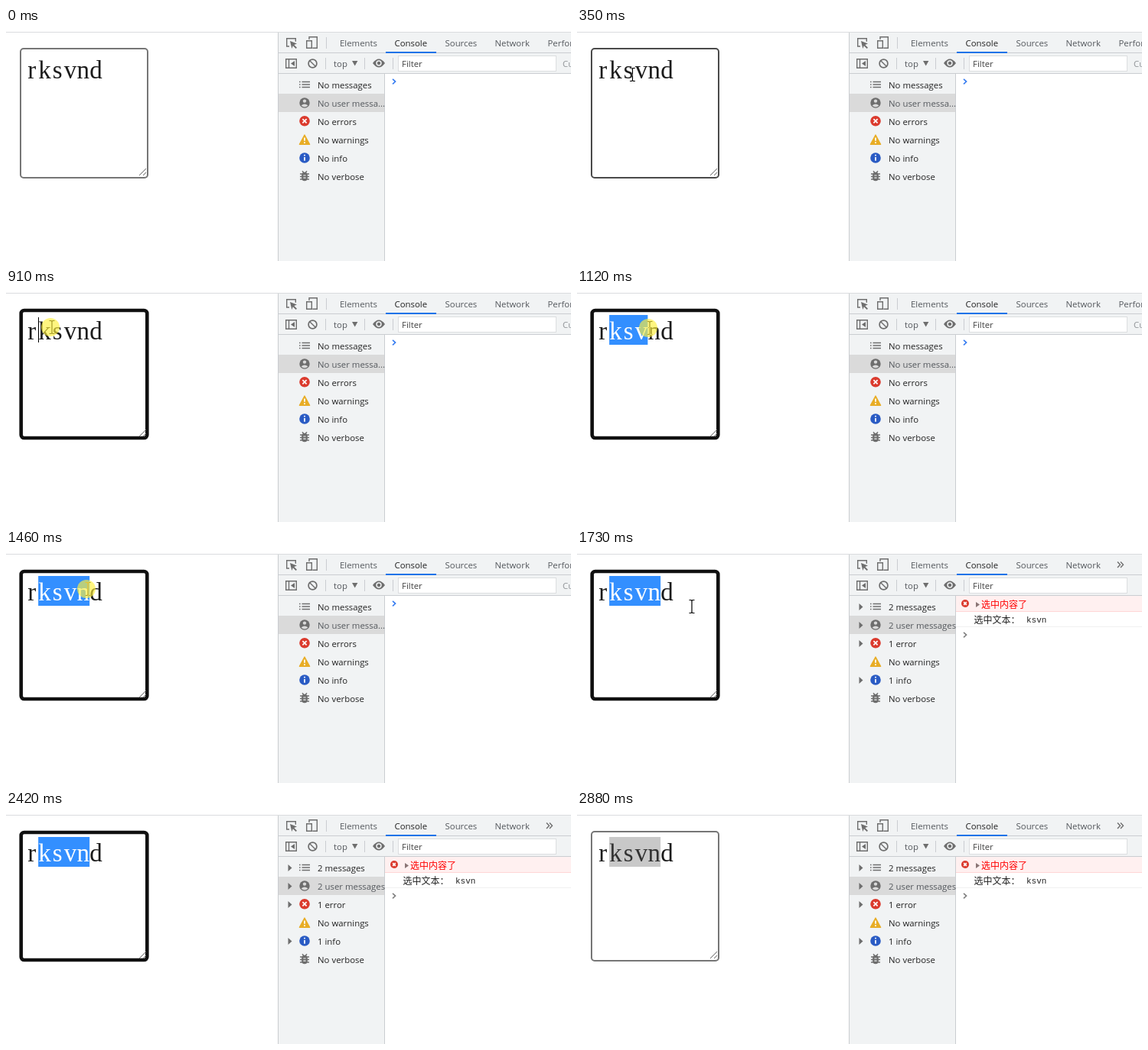
An HTML page that plays this animation: 738x305 px, repeating every 3010 ms.

```html
<!DOCTYPE html>
<html lang="en">
<head>
<meta charset="utf-8">
<title>Text selection with console output</title>
<style>
  html, body { margin: 0; width: 100%; height: 100%; overflow: hidden; background: #fff; }
  svg { display: block; }
  text { font: 11.4px "Open Sans", sans-serif; fill: #222; white-space: pre; }
  .muted { fill: #54585d; }
  .field { font: 33px "Liberation Serif", serif; text-anchor: middle; }
  .cjk { font: 12px "Noto Sans CJK SC", "Noto Sans CJK", sans-serif; }
  .mono { font: 11px "Liberation Mono", monospace; }
  .line { fill: none; stroke: #6e6e6e; stroke-width: 1.4; }
  .rule { fill: none; stroke: #cacdd1; }
  .gray { fill: #6e6e6e; }
  .white { fill: none; stroke: #fff; stroke-width: 1.7; }
</style>
</head>
<body>
<svg width="738" height="305" viewBox="0 0 738 305">
  <rect width="738" height="305" fill="#fff"/>

  <!-- text area -->
  <rect id="frame" fill="#fff"/>
  <path d="M174 193l9-9M179 193l4-4" stroke="#666" stroke-width="1"/>
  <rect id="selection" y="34" height="39"/>
  <g id="letters"></g>
  <path id="caret" d="M42.5 37v33" stroke="#000"/>

  <!-- developer tools -->
  <rect x="355" y="6" width="383" height="299" fill="#f1f3f4"/>
  <rect x="495" y="60" width="243" height="245" fill="#fff"/>
  <rect x="356" y="86" width="138" height="24" fill="#dadada"/>
  <path class="rule" d="M0 5.5H738" stroke-opacity=".7"/>
  <path class="rule" d="M355.5 6V305M356 32.5H738M356 59.5H738M494.5 60V305M418.5 12V27M417.5 39V54M468.5 39V54M505.5 39V54"/>
  <rect x="496" y="31" width="66" height="2" fill="#1a73e8"/>

  <!-- tab bar -->
  <path class="line" d="M370 24h-3.3v-10.3h11.6v4"/>
  <path class="gray" d="M371 17l9 3.4-3.7 1.5 3.7 3.8-1.4 1.4-3.8-3.8-1.5 3.7z"/>
  <path class="line" d="M396 15v-3.3h10.3v14.6h-6M392.7 16.7h6.6v9.6h-6.6z"/>
  <text class="muted" x="436" y="24">Elements</text>
  <text x="507.5" y="24">Console</text>
  <text class="muted" x="573.5" y="24">Sources</text>
  <text class="muted" x="638.5" y="24">Network</text>

  <!-- console toolbar -->
  <path class="line" d="M365.7 40.7h13.6v11.6h-13.6zM369.5 41v11"/>
  <path class="gray" d="M377 43v7l-5-3.5z"/>
  <circle class="line" cx="400.5" cy="46.5" r="5.4" style="stroke-width:1.7"/>
  <path class="line" d="M396.7 42.7l7.6 7.6"/>
  <text class="muted" x="428" y="51">top</text>
  <path class="gray" d="M452 43h7.4l-3.7 6.6z"/>
  <path class="gray" d="M479 46q8-11 16 0q-8 11-16 0z"/>
  <circle cx="487" cy="46" r="3.7" fill="#f1f3f4"/>
  <circle class="gray" cx="487" cy="46" r="2.2"/>
  <rect x="512.5" y="36.5" width="206" height="20" fill="#fff" stroke="#dcdee0"/>
  <text x="517" y="51" fill-opacity=".85">Filter</text>

  <!-- sidebar icons -->
  <path class="line" d="M386.5 70.5h10.5M386.5 74h10.5M386.5 77.5h10.5M383 70.5h1.6M383 74h1.6M383 77.5h1.6"/>
  <circle class="gray" cx="390" cy="98" r="6.7"/>
  <circle cx="390" cy="95.6" r="2.2" fill="#dadada"/>
  <path d="M385.6 101.6q4.4-4 8.8 0q-4.4 4-8.8 0z" fill="#dadada"/>
  <circle cx="390" cy="121.8" r="6.8" fill="#db3b2e"/>
  <path class="white" d="M387.4 119.2l5.2 5.2m0-5.2l-5.2 5.2"/>
  <path d="M390 140l6.6 12.3h-13.2z" fill="#e8ad26" stroke="#e8ad26" stroke-width="1.4" stroke-linejoin="round"/>
  <path class="white" d="M390 143.5v4.3M390 149.3v1.7"/>
  <circle cx="390" cy="170" r="6.8" fill="#2a5bc4"/>
  <path class="white" d="M390 169v4.7M390 165.7v1.8"/>
  <rect class="gray" x="386.2" y="188.8" width="7.6" height="11.4" rx="3.8"/>
  <path class="line" d="M384 191h12M384 194.5h12M384 198h12M387 187.3l2 2.2M393 187.3l-2 2.2"/>
  <path d="M388.4 193h3.2M388.4 196.2h3.2" stroke="#f1f3f4" stroke-width="1.2"/>
  <g id="labels"></g>

  <!-- console output -->
  <g id="before">
    <text class="muted" x="707.5" y="24">Performance</text>
    <text class="muted" x="727" y="51" fill-opacity=".6">Custom levels</text>
  </g>
  <g id="after">
    <path class="line" d="M706 15.5l3.5 3.7-3.5 3.7M710 15.5l3.5 3.7-3.5 3.7" stroke-width="1.2"/>
    <path class="gray" d="M368.5 70v9l5-4.5zM368.5 94v9l5-4.5zM368.5 118v9l5-4.5zM368.5 166v9l5-4.5z"/>
    <rect x="495" y="60" width="243" height="20.5" fill="#fff0f0"/>
    <path d="M495 80.5H738" stroke="#ffd6d6"/>
    <path d="M495 100.5H738" stroke="#f0f0f0"/>
    <circle cx="507" cy="70" r="5" fill="#db3b2e"/>
    <path class="white" d="M505.2 68.2l3.6 3.6m0-3.6l-3.6 3.6" stroke-width="1.3"/>
    <path d="M521 68v7l5-3.5z" fill="#8a7575"/>
    <text class="cjk" x="528" y="75.5" style="fill:#f00">选中内容了</text>
    <text class="cjk" x="518.5" y="95.5">选中文本：</text>
    <text class="mono" id="logged" x="587" y="95"></text>
  </g>
  <path id="prompt" d="M505 66.8l3.6 3.3-3.6 3.3" fill="none" stroke-width="1.6"/>

  <!-- pointer -->
  <g id="pointer">
    <path id="beam" d="M-3.5-8.5h2.5l1 1 1-1h2.5M0-7.5v15M-3.5 8.5h2.5l1-1 1 1h2.5" fill="none" stroke="#fff" stroke-width="1.2" style="mix-blend-mode:difference"/>
    <circle id="press" cx="-2" r="12" fill="#fff03c" fill-opacity=".65"/>
    <path id="arrow" d="M.5.5v16l3.7-3.5 2.6 6 2.5-1.1-2.6-5.8h5z" fill="#fff" stroke="#000"/>
  </g>
</svg>
<script>
const LOOP = 3010;
const WORD = 'rksvnd';
const CELL = 16.75, LEFT = 25.4;
const $ = id => document.getElementById(id);

// [start ms, x, y, shape]
const POINTER = [
  [0, 0, 0, ''],
  [70, 423, 207, 'arrow'], [140, 322, 166, 'arrow'], [210, 214, 118, 'arrow'],
  [280, 120, 81, 'beam'], [350, 72.5, 61, 'beam'], [430, 58, 54, 'beam'],
  [500, 51, 51, 'beam'], [570, 48, 50, 'beam'],
  [640, 49, 50, 'press'], [840, 52, 50, 'press'], [910, 60, 50, 'press'],
  [980, 71, 50, 'press'], [1050, 83, 50, 'press'], [1120, 95, 51, 'press'],
  [1250, 98, 51, 'press'], [1320, 102, 51, 'press'], [1390, 105, 51, 'press'],
  [1460, 107, 51, 'press'],
  [1660, 110, 53, 'beam'], [1730, 150, 74, 'beam'], [1800, 240, 122, 'arrow'],
  [1870, 365, 190, 'arrow'], [1930, 475, 242, 'arrow'], [2000, 568, 274, 'arrow'],
  [2070, 630, 288, 'arrow'], [2140, 676, 295, 'arrow'], [2210, 686, 297, 'arrow'],
  [2280, 693, 299, 'arrow'], [2350, 697, 301, 'arrow'],
  [2420, 0, 0, '']
];
// [start ms, last selected letter]
const SELECTED = [[0, 1], [980, 3], [1120, 4], [1320, 5]];
// [start ms, border colour, focused]
const BORDER = [[0, '#767676', 0], [280, '#4a4a4a', 0], [640, '#101010', 1], [2880, '#767676', 0]];
const LOG_TIME = 1730;
const LABELS = [
  ['No messages', '2 messages'],
  ['No user messa...', '2 user messages'],
  ['No errors', '1 error'],
  ['No warnings', 'No warnings'],
  ['No info', '1 info'],
  ['No verbose', 'No verbose']
];

function addText(parent, x, y, content, className) {
  const node = document.createElementNS('http://www.w3.org/2000/svg', 'text');
  node.setAttribute('x', x);
  node.setAttribute('y', y);
  node.setAttribute('class', className);
  node.textContent = content;
  return parent.appendChild(node);
}

const set = (id, attributes) => {
  for (const name in attributes) $(id).setAttribute(name, attributes[name]);
};
const show = (id, on) => { $(id).style.display = on ? '' : 'none'; };
const stepAt = (table, time) => table.findLast(row => row[0] <= time);

const letters = [...WORD].map((letter, i) =>
  addText($('letters'), LEFT + CELL * (i + .5), 66, letter, 'field'));
const labels = LABELS.map((pair, i) =>
  addText($('labels'), 407, 79 + 24 * i, pair[0], i === 1 ? 'muted' : ''));
$('logged').textContent = WORD.slice(1, 5);

function drawField(time) {
  const [, colour, focused] = stepAt(BORDER, time);
  const last = stepAt(SELECTED, time)[1];
  const width = focused ? 4.6 : 2;
  const inset = width / 2;
  set('frame', {
    x: 18 - focused * .6 + inset, y: 26 - focused * .3 + inset,
    width: 168 + focused * 1.2 - width, height: 171 + focused * .6 - width,
    rx: 4, stroke: colour, 'stroke-width': width
  });
  set('selection', {
    x: LEFT + CELL, width: CELL * (last - 1),
    fill: focused ? '#338fff' : '#c8c8c8'
  });
  letters.forEach((letter, i) => {
    const selected = i > 0 && i < last;
    letter.style.fill = !selected ? '#1c1c1c' : focused ? '#fff' : '#323232';
  });
  show('caret', focused && last === 1);
}

function drawConsole(time) {
  const logged = time >= LOG_TIME;
  show('before', !logged);
  show('after', logged);
  labels.forEach((label, i) => { label.textContent = LABELS[i][+logged]; });
  set('prompt', {
    transform: `translate(0 ${logged ? 41 : 0})`,
    stroke: logged ? '#808080' : '#367cf1'
  });
}

function drawPointer(time) {
  const [, x, y, shape] = stepAt(POINTER, time);
  set('pointer', { transform: `translate(${x} ${y})` });
  show('arrow', shape === 'arrow');
  show('beam', shape === 'beam' || shape === 'press');
  show('press', shape === 'press');
}

const start = performance.now();
function draw() {
  const time = (performance.now() - start) % LOOP;
  drawField(time);
  drawConsole(time);
  drawPointer(time);
  requestAnimationFrame(draw);
}
draw();
</script>
</body>
</html>
```
